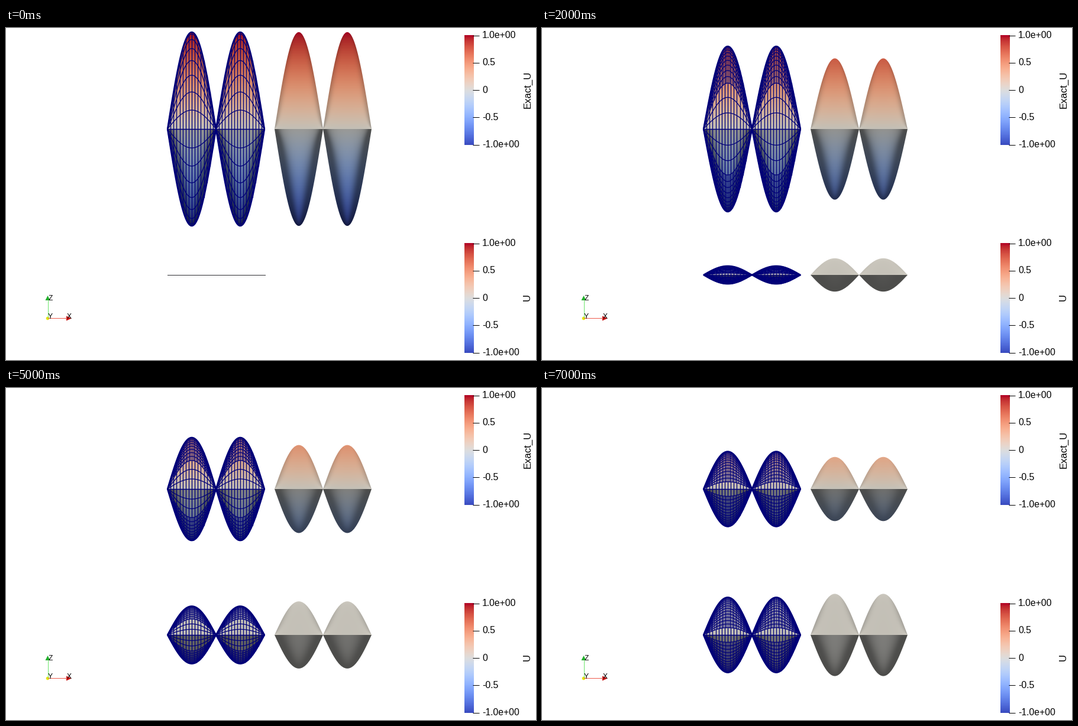
A matplotlib script that plays this animation: 896x562 px, repeating every 8 s.

```python
import numpy as np
import matplotlib.pyplot as plt
from matplotlib.animation import FuncAnimation
from matplotlib.collections import LineCollection

W, H, DPI = 896, 562, 64
PT = 72 / DPI                  # points per pixel
SIZE = 164                     # pixels per unit length
LEFT, RIGHT = 273, 454
TOP, BOTTOM = 171, 418
DECAY = 0.158
BOTTOM_SCALE = 104 / 164
NAVY = (0, 0, 0.47)
STEPS = 8
CMAP = plt.get_cmap("coolwarm")
WARM = np.array([1.0, 0.985, 0.94])
COOL = np.array([1.0, 1.0, 0.98])

fig = plt.figure(figsize=(W / DPI, H / DPI), dpi=DPI, facecolor="white")
ax = fig.add_axes([0, 0, 1, 1])
ax.axis("off")


def fade(step):
    return np.exp(-DECAY * max(step, 0))


def growth(step):
    return BOTTOM_SCALE * (1 - fade(step))


def paint(canvas, x0, y0, amp, coloured):
    """Shade the side view of amp * sin(2 pi x) * sin(2 pi y)."""
    if amp <= 0:
        return
    reach = int(amp * SIZE) + 2
    rows = np.arange(max(y0 - reach, 0), y0 + reach)
    cols = np.arange(x0, x0 + SIZE)
    x = (cols[None, :] + 0.5 - x0) / SIZE
    z = (y0 - rows[:, None] - 0.5) / SIZE
    wave = np.abs(np.sin(2 * np.pi * x))
    slope = amp * 2 * np.pi * np.cos(2 * np.pi * x)
    gap = (amp * wave - np.abs(z)) * SIZE
    alpha = np.clip(gap / np.sqrt(1 + slope ** 2) + 0.5, 0, 1)

    ratio = np.clip(np.abs(z) / (amp * wave + 1e-9), 0, 1)
    fx = slope * ratio
    fy = amp * 2 * np.pi * wave * np.sqrt(1 - ratio ** 2)
    norm = np.sqrt(1 + fx ** 2 + fy ** 2)
    nx, ny = np.abs(fx) / norm, fy / norm

    # the underside is lit only where it faces the viewer
    upper = 0.94 - 0.06 * ny - 0.25 * nx ** 4
    lower = 0.35 + 0.39 * ny ** 9
    light = np.where((z > 0)[..., None], upper[..., None] * WARM,
                     lower[..., None] * COOL)
    value = z + 0 * x if coloured else 0 * (z + x)
    rgb = CMAP((np.clip(value, -1, 1) + 1) / 2)[..., :3] * light
    area = canvas[rows[0]:rows[-1] + 1, x0:x0 + SIZE]
    area += alpha[..., None] * (rgb - area)


def curve(x0, y0, x, z):
    return np.column_stack([x0 + x * SIZE, y0 - z * SIZE])


def mesh(x0, y0, amp, start):
    """Grid lines, halved in size from row `start` up; and the outline."""
    lines = []
    x = np.linspace(0, 1, 129)
    wave = np.abs(np.sin(2 * np.pi * x))
    border = min(start, 2)
    for sign in (1, -1):
        for j in np.arange(0, 8, 0.5):
            height = sign * amp * np.sin(2 * np.pi * j / 32)
            if j % 1 == 0:
                lines.append(curve(x0, y0, x, height * wave))
            elif j > start:
                edge = border / 32
                for a in (0, 0.5):
                    part = (x >= a + edge) & (x <= a + 0.5 - edge)
                    lines.append(curve(x0, y0, x[part], height * wave[part]))
        for i in np.arange(0, 32, 0.5):
            s = amp * abs(np.sin(2 * np.pi * i / 32))
            if i % 1 == 0:
                low = 0
            elif start < 8 and border < i % 16 < 16 - border:
                low = np.sin(2 * np.pi * start / 32)
            else:
                continue
            lines.append(curve(x0, y0, np.full(2, i / 32),
                               sign * s * np.array([low, 1])))
    rims = [curve(x0, y0, x, sign * amp * wave) for sign in (1, -1)]
    return lines, rims


def label(x, y, text, size, **style):
    ax.text(x, y, text, fontsize=size * PT, family="Liberation Sans",
            color="black", **style)


def colour_bar(y0, title):
    ramp = np.linspace(1, 0, 256)[:, None]
    ax.imshow(ramp, cmap=CMAP, extent=(775, 791, y0 + 186, y0), aspect="auto",
              vmin=0, vmax=1, zorder=2)
    for i, text in enumerate(["1.0e+00", "0.5", "0", "-0.5", "-1.0e+00"]):
        y = y0 + 0.7 + 46.25 * i
        ax.plot([788.5, 800], [y, y], color="black", lw=PT, zorder=3,
                solid_capstyle="butt")
        label(805, y + 4.5, text, 15.8, va="baseline")
    label(886, y0 + 92, title, 16.7, rotation=90, rotation_mode="anchor",
          ha="center", va="baseline")


def orientation_axes():
    ax.plot([70.5, 70.5], [490, 460], color="#6be46b", lw=PT)
    ax.plot([71, 103], [491.2, 491.2], color="#ee5a4c", lw=PT)
    ax.fill([66.5, 70.5, 74.5], [461, 453, 461], color="#22b02c", lw=0)
    ax.fill([102, 111, 102], [487.5, 491.5, 495.5], color="#cc1414", lw=0)
    ax.add_patch(plt.Circle((70.5, 491.5), 2.8, color="#e6e610", lw=0))
    label(71.5, 461, "Z", 12)
    label(71, 492.5, "Y", 12)
    label(103, 492.5, "X", 12)


picture = ax.imshow(np.ones((H, W, 3)), extent=(0, W, H, 0),
                    interpolation="nearest", vmin=0, vmax=1, zorder=0)
grid = LineCollection([], colors=[NAVY], linewidths=1.3 * PT, zorder=3)
rim = LineCollection([], colors=[NAVY], linewidths=2.3 * PT, zorder=4)
ax.add_collection(grid)
ax.add_collection(rim)
flat, = ax.plot([LEFT - 0.5, LEFT + SIZE + 0.5], [417.5, 417.5],
                color="#303034", lw=PT, zorder=3)
colour_bar(12, "Exact_U")
colour_bar(364, "U")
orientation_axes()
ax.set_xlim(0, W)
ax.set_ylim(H, 0)
ax.set_aspect("auto")


def update(step):
    canvas = np.ones((H, W, 3))
    # the left column lags one step behind the right one
    left_top, left_bottom = fade(step - 1), growth(step - 1)
    paint(canvas, LEFT, TOP, left_top, True)
    paint(canvas, RIGHT, TOP, fade(step), True)
    paint(canvas, LEFT, BOTTOM, left_bottom, False)
    paint(canvas, RIGHT, BOTTOM, growth(step), False)
    picture.set_data(np.clip(canvas, 0, 1))

    start = 8 if step == 0 else 3 if step < 6 else 1
    lines, rims = mesh(LEFT, TOP, left_top, start)
    flat.set_visible(left_bottom <= 0)
    if left_bottom > 0:
        start = 3 if step in (4, 5) else 1
        more_lines, more_rims = mesh(LEFT, BOTTOM, left_bottom, start)
        lines += more_lines
        rims += more_rims
    grid.set_segments(lines)
    rim.set_segments(rims)
    return picture, grid, rim, flat


anim = FuncAnimation(fig, update, frames=STEPS, interval=1000, repeat=True,
                     repeat_delay=0, blit=False)
plt.show()
```
